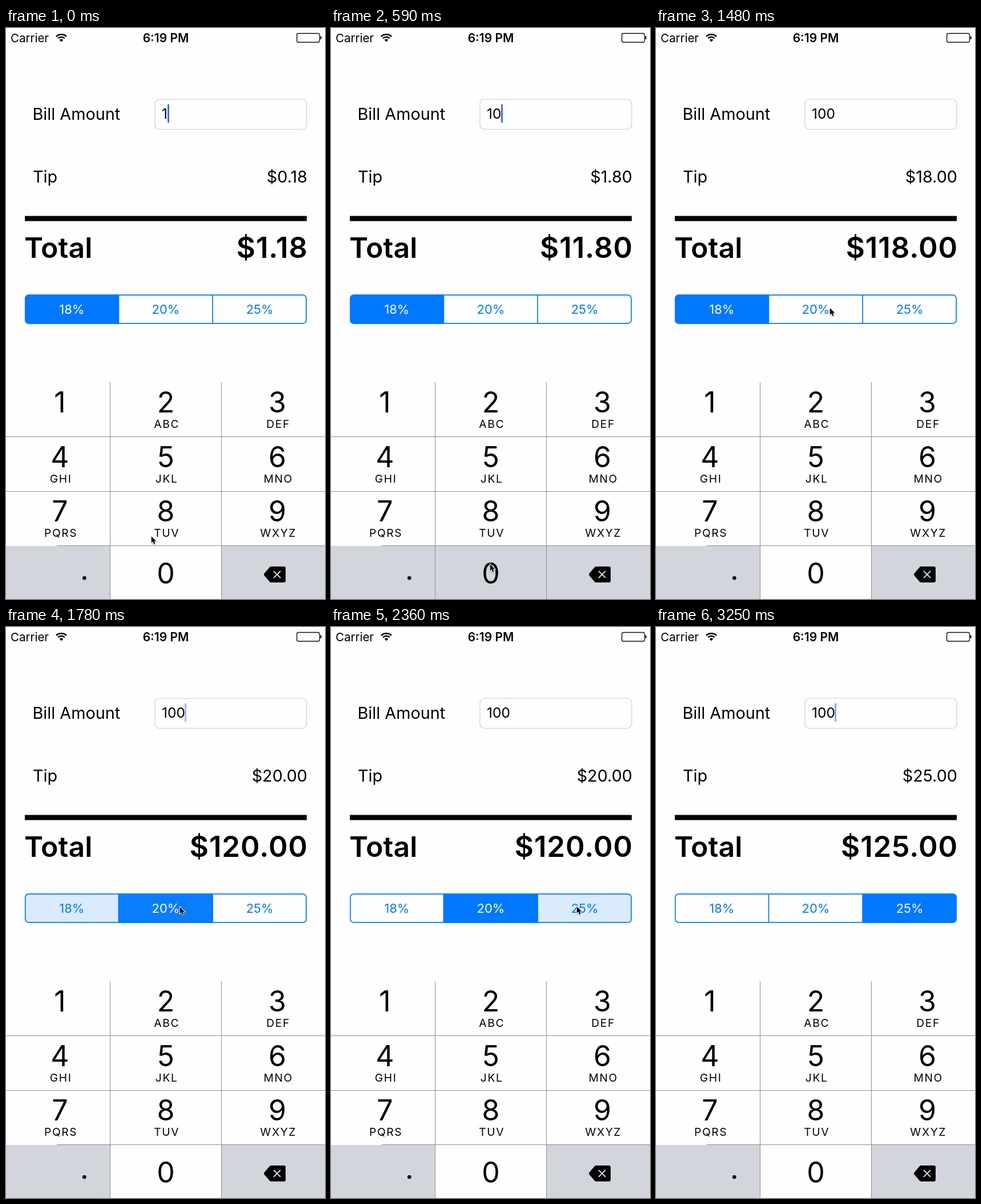
Animation of 559 by 1001 pixels, one loop 3350 ms. Source, as an HTML page with a canvas:

```html
<!DOCTYPE html>
<html lang="en">
<head>
<meta charset="utf-8">
<title>Tip calculator</title>
<style>
  html, body { margin: 0; width: 100%; height: 100%; overflow: hidden; background: #fefefe; }
  canvas { display: block; }
</style>
</head>
<body>
<canvas id="stage" width="559" height="1001"></canvas>
<script>
const ctx = document.getElementById('stage').getContext('2d');
const LOOP = 3350, TICK = 147.5, PRESS = 145;
const PAPER = '#fefefe', BLUE = '#0078ff', KEY = '#d2d5dc', RULE = '#8f8f92';
const RATES = [18, 20, 25];

const zeroTaps = [580, 730];
const rateTaps = [{ time: -LOOP, index: 0 }, { time: 1769, index: 1 }, { time: 2503, index: 2 }];
const journeys = [
  { start: 0, end: 140, x: 277, y: 939 },
  { start: 740, end: 880, x: 315, y: 932 },
  { start: 880, end: 1030, x: 375, y: 511 },
  { start: 1030, end: 1325, x: 303, y: 490 },
  { start: 1770, end: 1915, x: 429, y: 489 },
  { start: 2510, end: 2650, x: 489, y: 952 },
  { start: 2800, end: 2945, x: 501, y: 999 },
  { start: 2950, end: 3090, x: 530, y: 1020 }
];

const clamp = v => Math.min(1, Math.max(0, v));
const smooth = v => v * v * (3 - 2 * v);
const mix = (a, b, p) => a + (b - a) * p;

function pointerAt(t) {
  return journeys.reduce((from, to) => {
    const p = smooth(clamp((t - to.start) / (to.end - to.start)));
    return { x: mix(from.x, to.x, p), y: mix(from.y, to.y, p) };
  }, { x: 253, y: 890 });
}

// Solid while typing, then a soft blink
function caretAt(t) {
  const period = 970, solid = 330;
  const cycle = Math.max(0, t - zeroTaps.at(-1) - solid) % period;
  return clamp(0.5 + (Math.abs(cycle - period / 2) - 225) / 150);
}

// Index of the chosen rate and how strongly each segment is filled
function segmentsAt(t) {
  const done = rateTaps.filter(tap => tap.time <= t);
  const next = rateTaps[done.length];
  const current = done.at(-1), previous = done.at(-2);
  const progress = clamp((t - current.time) / PRESS);
  const fills = RATES.map(() => 0);
  if (previous && progress < 1) fills[previous.index] = 0.14 * (1 - progress);
  if (next && t > next.time - PRESS) fills[next.index] = 0.14;
  fills[current.index] = mix(0.96, 1, progress);
  return { chosen: current.index, fills };
}

function text(str, x, y, size, { align = 'left', weight = 400, color = '#000', spacing = 0 } = {}) {
  ctx.font = `${weight} ${size}px Inter, Roboto, sans-serif`;
  ctx.letterSpacing = spacing + 'px';
  ctx.textAlign = align;
  ctx.fillStyle = color;
  ctx.fillText(str, x, y);
}

function rect(x, y, w, h, color) {
  ctx.fillStyle = color;
  ctx.fillRect(x, y, w, h);
}

function rounded(x, y, w, h, r) {
  ctx.beginPath();
  ctx.roundRect(x, y, w, h, r);
}

function polygon(points) {
  ctx.beginPath();
  points.forEach(([x, y]) => ctx.lineTo(x, y));
  ctx.closePath();
}

function fill(color) {
  ctx.fillStyle = color;
  ctx.fill();
}

function stroke(color, width) {
  ctx.strokeStyle = color;
  ctx.lineWidth = width;
  ctx.stroke();
}

function drawStatusBar() {
  text('Carrier', 8, 25, 20.5);
  text('6:19 PM', 280, 25, 21, { align: 'center', weight: 600 });

  const from = -Math.PI * 0.75, to = -Math.PI * 0.25;
  for (const r of [12.8, 8.2]) {
    ctx.beginPath();
    ctx.arc(97, 24, r, from, to);
    stroke('#000', 2.6);
  }
  ctx.beginPath();
  ctx.moveTo(97, 24.5);
  ctx.arc(97, 24, 4.6, from, to);
  fill('#000');

  rounded(509.5, 9.5, 40, 15.5, 3);
  stroke('#111', 1.3);
  rounded(550.5, 14, 2.3, 6, [0, 2, 2, 0]);
  fill('#111');
  rect(511, 11, 1, 12, '#f5a9a5');
}

function drawBill(amount, rate, caret) {
  const tip = amount * rate / 100;
  const money = value => '$' + value.toFixed(2);

  text('Bill Amount', 46.5, 161, 28.8);
  rounded(261, 125, 266, 52.5, 8);
  stroke('#cdcdcf', 1.2);
  text(String(amount), 273, 159, 24.5);
  ctx.globalAlpha = caret;
  rounded(268 + 15 * String(amount).length, 133.5, 3, 32.5, 1);
  fill('#426bf2');
  ctx.globalAlpha = 1;

  text('Tip', 47, 270.5, 28.8);
  text(money(tip), 528, 270.5, 28.8, { align: 'right' });
  rect(33, 329.5, 494, 9, '#000');
  text('Total', 32, 403, 50, { weight: 600 });
  text(money(amount + tip), 529, 403, 51, { align: 'right', weight: 600, spacing: 0.9 });
}

function drawSegments({ chosen, fills }) {
  const left = 33, width = 494 / RATES.length;
  ctx.save();
  rounded(left, 467.3, 494, 51.4, 7);
  ctx.clip();
  fills.forEach((strength, i) => {
    ctx.globalAlpha = strength;
    rect(left + i * width, 467, width, 52, BLUE);
  });
  ctx.restore();
  rounded(33.8, 468.1, 492.4, 49.8, 6);
  stroke(BLUE, 1.7);
  RATES.forEach((rate, i) => {
    if (i) rect(left + i * width - 1.1, 468, 1.7, 50, BLUE);
    const color = i === chosen ? '#fff' : BLUE;
    text(rate + '%', left + (i + 0.5) * width, 501, 22, { align: 'center', color });
  });
}

function drawBackspace() {
  ctx.lineJoin = 'round';
  polygon([[455, 958], [464.5, 947], [487, 947], [487, 969], [464.5, 969]]);
  fill('#000');
  stroke('#000', 6);
  ctx.beginPath();
  for (const side of [-6, 6]) {
    ctx.moveTo(475 - side, 952);
    ctx.lineTo(475 + side, 964);
  }
  stroke(KEY, 2);
}

function drawKeypad(pressed) {
  const letters = ['', 'ABC', 'DEF', 'GHI', 'JKL', 'MNO', 'PQRS', 'TUV', 'WXYZ'];
  const rowHeight = 95.5;

  rect(0, 908, 559, 93, KEY);
  if (!pressed) rect(183, 908, 194, 93, PAPER);

  for (const x of [182, 377]) rect(x, 621, 1, 380, RULE);
  for (const y of [716, 812]) rect(0, y, 559, 1, RULE);
  rect(89, 907, 470, 1, RULE);

  letters.forEach((label, i) => {
    const x = 94.5 + 190.5 * (i % 3) - (i % 3 === 1 ? 5 : 0);
    const y = 674 + rowHeight * Math.floor(i / 3);
    text(String(i + 1), x, y, 50, { align: 'center' });
    text(label, x + 1.7, y + 27, 19.3, { align: 'center', spacing: 1.6 });
  });
  text('0', 280, 974, 50, { align: 'center' });
  ctx.beginPath();
  ctx.arc(137.3, 964.3, 3.3, 0, Math.PI * 2);
  fill('#000');
  drawBackspace();
}

function drawPointer({ x, y }) {
  ctx.save();
  ctx.translate(x + 1.8, y + 1);
  ctx.lineJoin = 'miter';
  polygon([[0, 0], [0, 11.6], [2.6, 9.2], [4.6, 13.8], [6.7, 12.9], [4.7, 8.4], [8.4, 8.4]]);
  ctx.shadowColor = 'rgba(0, 0, 0, 0.35)';
  ctx.shadowBlur = 2;
  ctx.shadowOffsetY = 1;
  stroke('#fff', 1.8);
  ctx.shadowColor = 'transparent';
  fill('#000');
  ctx.restore();
}

function draw(t) {
  const segments = segmentsAt(t);
  const zeros = zeroTaps.filter(tap => tap <= t).length;
  const pressed = zeroTaps.some(tap => t >= tap && t < tap + 150);
  rect(0, 0, 559, 1001, PAPER);
  drawStatusBar();
  drawBill(10 ** zeros, RATES[segments.chosen], caretAt(t));
  drawSegments(segments);
  drawKeypad(pressed);
  drawPointer(pointerAt(t));
}

const start = performance.now();
function frame() {
  const t = (performance.now() - start) % LOOP;
  // The screen refreshes in even ticks; the small lead absorbs rounding
  draw(Math.floor((t + 5) / TICK) * TICK);
  requestAnimationFrame(frame);
}
frame();
</script>
</body>
</html>
```
